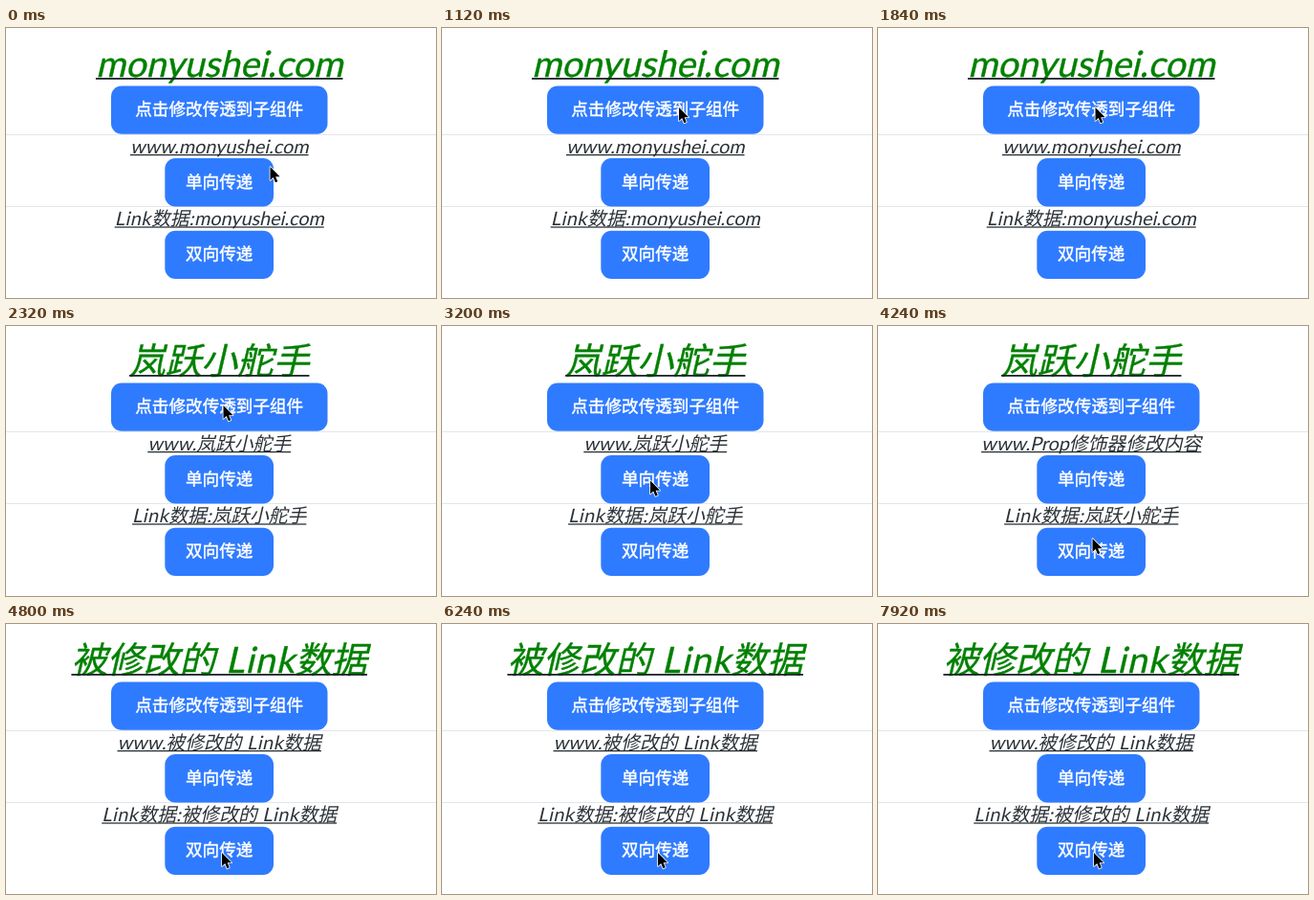
Write an HTML page that moves like this. It is 450 px wide and 282 px high and loops after 8 s.

```html
<!DOCTYPE html>
<html lang="zh-CN">
<head>
<meta charset="utf-8">
<title>组件数据传递</title>
<style>
  html, body { margin: 0; width: 100%; height: 100%; overflow: hidden; background: #fff; }
  svg { display: block; width: 450px; height: 282px; }
  text { text-anchor: middle; font-family: Lato, "Noto Sans CJK SC", "Noto Sans CJK", sans-serif; }
  .label { font-size: 19.8px; fill: #2b3238; }
  .title { font-size: 37.7px; fill: #008000; stroke: #008000; stroke-width: .4px; }
  .wide { letter-spacing: .028em; }
  .button text {
    font: 500 17.6px "Noto Sans CJK SC", "Noto Sans CJK", sans-serif;
    fill: #fff; stroke: #fff; stroke-width: .45px;
  }
  .button rect { fill: #2f7bff; }
  .rule { fill: #e2e5ea; }
  .line { fill: #1c2428; }
</style>
</head>
<body>
<svg viewBox="0 0 450 282">
  <g id="page"></g>
  <path id="cursor" d="M0 0V14l3.2-2.9 2.2 5.2 2.4-1-2.2-5h4.5z"
        fill="#000" stroke="#fff" stroke-width="1.6" stroke-linejoin="round" paint-order="stroke"/>
</svg>
<script>
const LOOP = 8000, STEP = 80, CENTER = 223.2;
const page = document.getElementById('page');
const cursor = document.getElementById('cursor');

// title, one-way text, two-way text, vertical shift
const states = [
  { at: 0, texts: ['monyushei.com', 'www.monyushei.com', 'Link数据:monyushei.com'], dy: 0 },
  { at: 2000, texts: ['岚跃小舵手', 'www.岚跃小舵手', 'Link数据:岚跃小舵手'], dy: -1 },
  { at: 3360, texts: ['岚跃小舵手', 'www.Prop修饰器修改内容', 'Link数据:岚跃小舵手'], dy: -1 },
  { at: 4640, texts: ['被修改的 Link数据', 'www.被修改的 Link数据', 'Link数据:被修改的 Link数据'], dy: 0 }
];

// time, x, y of the pointer tip
const path = [
  [0, 276.5, 145], [240, 276.5, 145], [960, 248, 83], [1360, 248, 83],
  [1840, 227.5, 83], [2400, 227.5, 83], [2960, 218, 161.5], [3520, 218, 161.5],
  [4080, 224.5, 222], [4240, 224.5, 222], [4560, 226, 239], [LOOP, 226, 239]
];

function add(parent, tag, attrs = {}) {
  const el = document.createElementNS('http://www.w3.org/2000/svg', tag);
  for (const k in attrs) el.setAttribute(k, attrs[k]);
  return parent.appendChild(el);
}

function addButton(x, y, width, label) {
  const g = add(page, 'g', { class: 'button' });
  add(g, 'rect', { x, y, width, height: 50.3, rx: 11 });
  add(g, 'text', { x: x + width / 2, y: y + 30.7 }).textContent = label;
}

function addText(cls, y, gap, thick) {
  const text = add(page, 'text', { class: cls, transform: `translate(${CENTER} ${y}) skewX(-13)` });
  const line = add(page, 'rect', { class: 'line', y: y + gap, height: thick });
  return str => {
    text.innerHTML = str.replace(/ ?Link:?|:/g, '<tspan class="wide">$&</tspan>');
    const w = text.getComputedTextLength();
    line.setAttribute('x', CENTER - w / 2);
    line.setAttribute('width', w);
  };
}

for (const y of [111, 186]) add(page, 'rect', { class: 'rule', x: 0, y, width: 450, height: 1 });
addButton(110, 60.5, 226.5, '点击修改传透到子组件');
addButton(166.3, 136.1, 113.7, '单向传递');
addButton(166.3, 211.7, 113.7, '双向传递');
const setters = [
  addText('title', 50.7, 1.3, 1.8),
  addText('label', 130.7, 1.3, 1.2),
  addText('label', 206, 1.4, 1.2)
];

function pointerAt(t) {
  const i = path.findIndex(p => p[0] > t);
  const [t0, x0, y0] = path[i - 1], [t1, x1, y1] = path[i];
  const u = (t - t0) / (t1 - t0), e = u * u * (3 - 2 * u);
  return [x0 + (x1 - x0) * e, y0 + (y1 - y0) * e];
}

let shown;
function draw(t) {
  const state = states.filter(s => s.at <= t).pop();
  if (state !== shown) {
    shown = state;
    state.texts.forEach((s, i) => setters[i](s));
    page.setAttribute('transform', `translate(0 ${state.dy})`);
  }
  cursor.setAttribute('transform', `translate(${pointerAt(t)})`);
}

const start = performance.now();
function tick() {
  const t = (performance.now() - start) % LOOP;
  draw(Math.floor(t / STEP) * STEP);
  requestAnimationFrame(tick);
}
tick();
</script>
</body>
</html>
```
